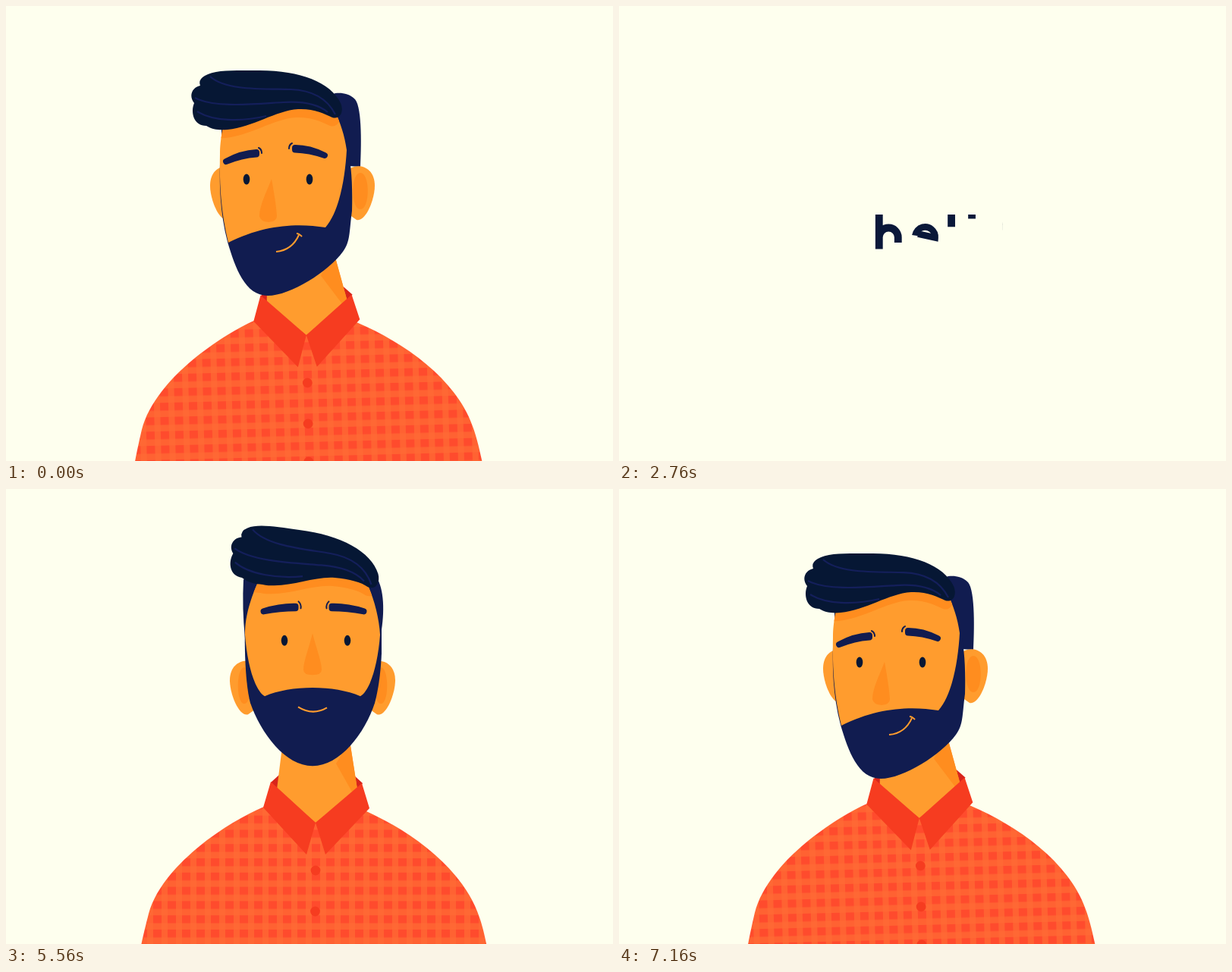
An HTML page for the animation above (7.2 s loop, 800 by 600 pixels).

```html
<!DOCTYPE html>
<html lang="en">
<head>
<meta charset="utf-8">
<title>Hello</title>
<style>
html, body { margin: 0; width: 100%; height: 100%; overflow: hidden; background: #feffee; }
svg { display: block; width: 800px; height: 600px; }
.skin { fill: #ff9c2e; }
.shade { fill: #ff8d1f; }
.navy { fill: #111c50; }
.ink { fill: #061734; }
.collar { fill: #f63c20; }
.fold { fill: #d8251c; }
.brow { fill: #111c50; stroke: #111c50; stroke-width: 8; stroke-linejoin: round; }
.crease { fill: none; stroke: #111c50; stroke-width: 2; stroke-linecap: round; }
.mouth { fill: none; stroke: #ff9c2e; stroke-width: 2; }
.strand { fill: none; stroke: #141f5b; stroke-width: 2.2; }
.letter { fill: none; stroke: #0a1839; stroke-width: 9.8; }
</style>
</head>
<body>
<svg viewBox="0 0 800 600">
  <defs>
    <pattern id="check" width="19" height="18.8" patternUnits="userSpaceOnUse" x="403" y="475">
      <rect width="19" height="19" fill="#ff4b2d"/>
      <path d="M11 0h8v19h-8zM0 10.5h19v8.3h-19z" fill="#ff8c3c" fill-opacity=".35" fill-rule="nonzero"/>
      <path d="M11 10.5h8v8.3h-8z" fill="#ff8c3c" fill-opacity=".16"/>
    </pattern>
    <clipPath id="face"><path id="faceClip"/></clipPath>
    <path id="quiff"/>
  </defs>
  <g id="man">
    <g id="body">
      <path class="fold" d="M349 375L360 365V390ZM458 365L470 376L462 390Z"/>
      <path fill="url(#check)" d="M340 407C290 428 205 485 188 548C180 580 172 610 160 700H651C640 620 632 575 624 553C605 495 545 445 475 413L408 420Z"/>
      <path id="neck" class="skin"/>
      <path id="neckShade" class="shade"/>
      <path class="collar" d="M349 374L339 408L396 470L408 428ZM469 376L479 409L421 470L408 428Z"/>
      <g class="collar">
        <circle cx="408" cy="491" r="6.4"/><circle cx="407.5" cy="545" r="6.4"/><circle cx="407" cy="595" r="6.4"/>
      </g>
    </g>
    <g id="head">
      <g id="flip"></g>
      <g clip-path="url(#face)"><use href="#quiff" id="quiffShade" class="shade"/></g>
      <g id="hair">
        <use href="#quiff" class="ink"/>
        <path class="strand" d="M269 93C290 112 340 109 375 110C405 111 424 123 434 143M249 121C275 135 330 129 365 127C395 125 412 130 424 140M252 139C272 152 310 153 343 145"/>
      </g>
    </g>
  </g>
  <g id="word" role="img" aria-label="hello.">
    <path class="letter" d="M325 275V320.5V305A12.5 12.5 0 0 1 350 305V320.5"/>
    <path class="letter" style="stroke-width:8.6" d="M367 300.5L389.5 305.5A13.2 13.2 0 1 0 386.5 313"/>
    <path class="letter" d="M401.5 275V320.5"/>
    <path class="letter" d="M418.5 275V320.5"/>
    <path class="letter" d="M446.5 290.5A13 13 0 1 0 446.6 290.5"/>
    <circle id="dot" cx="473.5" cy="315.5" r="5.5" fill="#d83c74"/>
  </g>
</svg>
<script>
const $ = id => document.getElementById(id);
const clamp = x => Math.max(0, Math.min(1, x));
const smooth = p => p * p * (3 - 2 * p);
const span = (t, start, length) => clamp((t - start) / length);

// Eased value of a list of [time, value] keys
function track(t, keys) {
  let [t0, v0] = keys[0];
  for (const [t1, v1] of keys) {
    if (t < t1) return v0 + (v1 - v0) * smooth(span(t, t0, t1 - t0));
    [t0, v0] = [t1, v1];
  }
  return v0;
}

// Blends two paths of equal structure
function blend(a, b, p) {
  const to = b.match(/-?[\d.]+/g);
  let i = 0;
  return a.replace(/-?[\d.]+/g, n => (+n + (to[i++] - n) * p).toFixed(2));
}

// Ear with its outermost point at x; d is the side it points to
const ear = (x, d) =>
  `M${x - 32 * d} 214C${x - 20 * d} 207 ${x} 213 ${x} 237C${x} 255 ${x - 12 * d} 285 ${x - 24 * d} 282L${x - 34 * d} 275Z`;
const innerEar = (x, w) => `M${x} 220C${x + w} 220 ${x + w} 268 ${x} 268C${x - w} 268 ${x - w} 220 ${x} 220Z`;

// Quiff whose underside hangs lower by s
const quiff = s => `M430 147C440 150 446 140 441 128C428 100 385 84 330 85C300 85 275 84 262 92Q253 97 256 105C246 107 240 118 248 128C243 140 247 158 264 158C272 163 282 164 292 163C325 ${160 + s} 355 ${138 + s} 385 ${136 + s}C405 ${135 + s} 420 142 430 147Z`;

// Face above a beard line lowered by b
const faceFront = b => `M331 128C318 158 315 178 315 195C318 235 328 268 341 ${287 + b}C375 ${272 + b} 433 ${272 + b} 467 ${287 + b}C480 268 490 235 493 195C492 175 486 150 477 130L420 90L340 100Z`;
const faceSide = "M286 160C283 175 282 185 282 195C281 240 284 275 293 312C340 288 385 286 421 292C440 270 447 225 449 190C446 170 441 155 434 140L400 110L300 130Z";

// class, front pose, turned pose, vertical shift when looking up
const parts = [
  ["navy", "M313 122Q311 160 315 200L493 200C499 170 499 140 490 122C488 120 486 118 484 116L470 100Z",
    "M284 163Q284 170 284 200L467 212C468 190 470 135 460 123C452 115 442 114 434 115L420 120Z", 0],
  ["skin", ear(295, -1), ear(269, -1), 18],
  ["skin", ear(513, 1), ear(486, 1), 18],
  ["shade", innerEar(314, 11), innerEar(290, 8), 18],
  ["shade", innerEar(494, 11), innerEar(467, 13), 18],
  ["navy", "M315 180C314 220 316 262 322 285C336 325 368 368 404 368C440 368 473 325 486 285C492 262 494 240 495 220C495 210 495 200 495 180Z",
    "M284 180C281 210 279 262 292 311C302 345 315 382 345 382C375 382 425 350 444 324C454 310 452 300 456 270C457 230 455 210 449 178Z", 0],
  ["face", "", faceSide, 0],
  ["shade", "M404 208C400 225 392 245 392 256Q392 263 404 263Q416 263 416 256C416 245 408 225 404 208Z", "M350 228C345 242 334 262 334 277Q335 284 346 285Q357 284 357 277C356 262 353 245 350 228Z", -15],
  ["brow", "M338 185Q360 178 380 178.5V181Q360 181 338 185Z", "M290 205Q310 194 330 193V195.5Q310 197 290 205Z", -21],
  ["brow", "M470 185Q448 178 428 178.5V181Q448 181 470 185Z", "M420 197Q400 187 381 187V189.5Q400 190 420 197Z", -21],
  ["crease", "M384 172Q388 176 387 181", "M333 187Q337 189 337 194", -21],
  ["crease", "M424 172Q420 176 421 181", "M377 181Q373 183 373 188", -21],
  ["mouth", "M385 298Q404 310 423 299", "M356 324Q377 322 386 302", -8],
  ["mouth", "M423 299Q423 299 423 299", "M383 300Q386 300 390 304", -8]
].map(([cls, front, side, look]) => ({ cls, front, side, look, el: add("path", cls == "face" ? "skin" : cls) }));
const face = parts.find(p => p.cls == "face");
const brows = parts.filter(p => p.cls == "brow");
const eyes = [[362.5, 317], [445.5, 400]].map(([front, side]) => ({ front, side, el: add("ellipse", "ink") }));

function add(tag, cls) {
  const el = document.createElementNS("http://www.w3.org/2000/svg", tag);
  el.setAttribute("class", cls);
  return $("flip").appendChild(el);
}
const move = (el, x, y, more = "") => el.setAttribute("transform", `translate(${x} ${y}) ${more}`);

function drawMan(t) {
  const shown = t < 2250 || t >= 5200;
  $("man").style.display = shown ? "" : "none";
  if (!shown) return;

  // turn: -1 left, 0 front, 1 right
  const turn = track(t, [[0, -1], [720, 1], [960, 1], [1480, 0], [6280, 0], [7120, -1]]);
  const side = Math.abs(turn), right = turn > 0;
  const drop = t < 5000 ? 636 * smooth(span(t, 1550, 690) ** 0.85) : 0;
  const headY = drop + (t < 5000
    ? track(t, [[0, 0], [360, 22], [720, 0], [960, 0], [1550, -34]])
    : track(t, [[5190, 600], [5440, -29], [5600, 2], [5760, -3], [5920, 0], [6280, 0], [6700, 8], [7180, 0]]));
  const bodyY = drop + (t < 5000
    ? track(t, [[960, 0], [1550, -36]])
    : track(t, [[5190, 600], [5400, -30], [5560, 12], [5760, -4], [5920, 0]]));
  const lean = t < 5000 ? track(t, [[1550, 0], [1720, -15]]) : 0;
  const look = t < 5000 ? 0 : track(t, [[5400, 0], [5560, 1], [5900, 0]]);
  const shut = t < 5000 ? smooth(span(t, 1580, 120)) : 0;

  move($("body"), turn * (right ? 4 : 8) + lean / 2, bodyY + 6 * side,
    `rotate(${turn * (right ? 0.7 : 1.4)} 405 600)`);
  const n = 6 * turn;
  $("neck").setAttribute("d", `M${365 + n} 320L357 384L408 428L463 384L${453 + n} 320Z`);
  $("neckShade").setAttribute("d", `M${435 + n} 350L${453 + n} 320L463 384L457 389Z`);

  move($("head"), lean, headY);
  const mirror = right ? `translate(${808 - 4 * turn} 0) scale(-1 1)` : "";
  $("flip").setAttribute("transform", mirror);

  face.front = faceFront(15 * shut - 11 * look);
  const shift = (4.5 - (right ? 1.5 : 4.5) * side) * (right ? -1 : 1);
  for (const { cls, front, side: turned, look: up, el } of parts) {
    el.setAttribute("d", blend(front, turned, side));
    move(el, cls == "brow" || cls == "crease" ? shift / 3 : 0, up * look);
  }
  // brows slant outwards as the eyes close
  brows.forEach(({ el, look: up }, i) =>
    move(el, shift / 3, up * look, `rotate(${(i ? 9 : -9) * shut} ${i ? 428 : 380} 180)`));
  eyes.forEach(({ front, side: turned, el }, i) => {
    el.setAttribute("cx", front + (turned - front) * side + shift);
    el.setAttribute("cy", 210.5 + 18 * side - 8 * look + 6.5 * shut);
    el.setAttribute("rx", 4.3);
    el.setAttribute("ry", Math.max(i ? 0 : 0.6, 7 * (1 - shut)));
  });

  $("faceClip").setAttribute("d", blend(face.front, faceSide, side));
  $("faceClip").setAttribute("transform", mirror);
  $("quiff").setAttribute("d", quiff(5 * (1 - side)));
  const hx = 51 + turn * (right ? 30 : 51), hy = -27 * (1 - side) - (right ? 3 * side : 0);
  const spin = `rotate(${8 * (1 - side)} 343 124)`;
  move($("hair"), hx + lean * 0.3, hy, spin);
  move($("quiffShade"), hx - 3, hy + 11, spin);
}

const letters = [...$("word").children];
const enter = [2260, 2400, 2520, 2630, 2750, 2870];
const leave = [3840, 4110, 4300, 4370, 4430, 4700];
letters.forEach(el => el.setAttribute("pathLength", 1));

function drawWord(t) {
  letters.forEach((el, i) => {
    move(el, 60 * (1 - span(t, enter[i], 1100)) ** 2, 0);
    if (el.id == "dot") {
      el.setAttribute("r", 5.5 * (smooth(span(t, enter[i], 200)) - smooth(span(t, leave[i], 220))));
      return;
    }
    const from = span(t, leave[i], 480), to = smooth(span(t, enter[i], 600));
    el.style.display = to > from ? "" : "none";
    el.setAttribute("stroke-dasharray", from || to < 1 ? `0 ${from} ${Math.max(0, to - from)} 2` : "none");
  });
}

const begin = performance.now();
function frame(now) {
  const t = Math.max(0, now - begin) % 7200;
  drawMan(t);
  drawWord(t);
  requestAnimationFrame(frame);
}
frame(begin);
</script>
</body>
</html>
```
